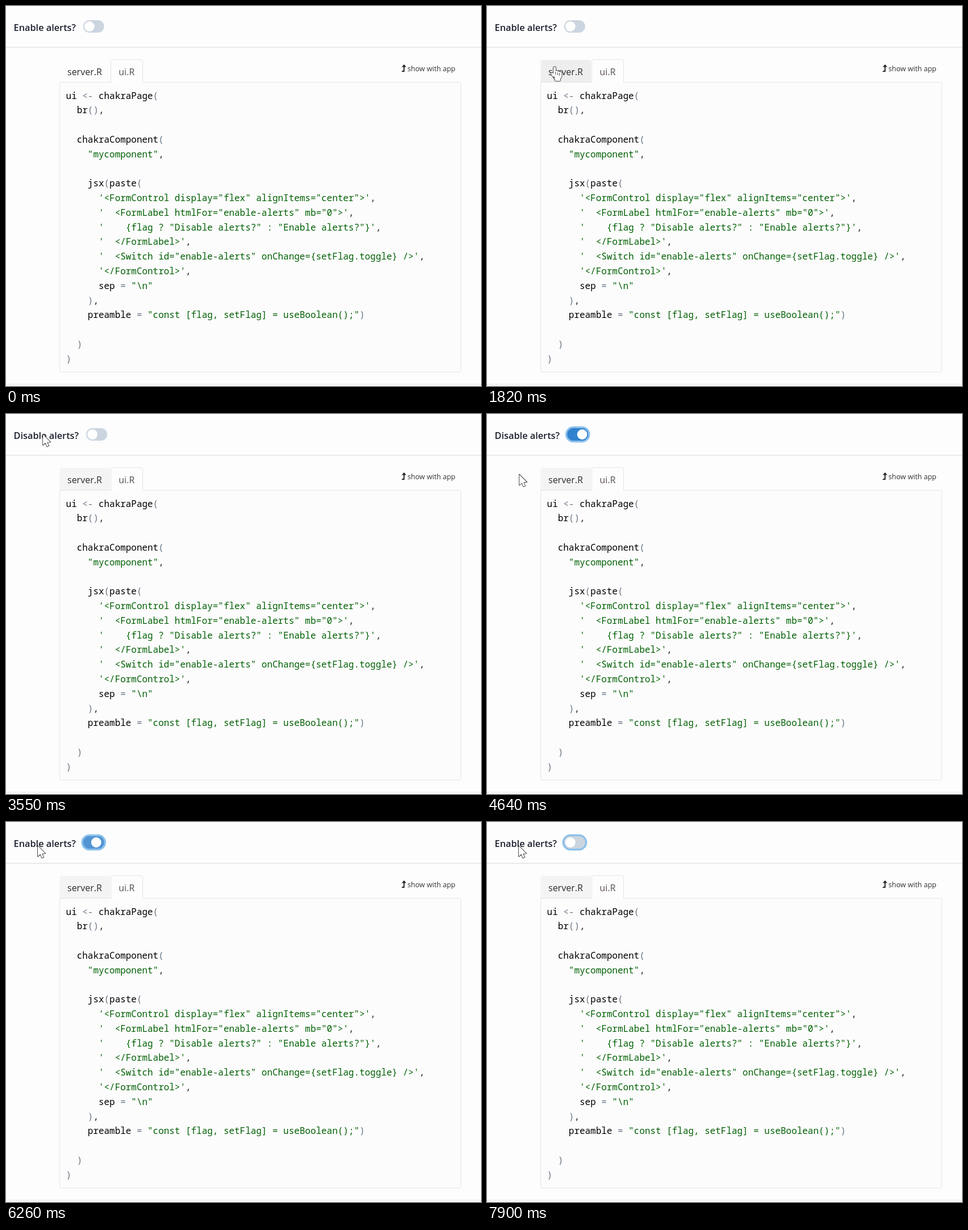
Recreate the animation shown at these times as an HTML page with a canvas. Size 836 by 670 pixels, loop 8000 ms.

```html
<!DOCTYPE html>
<html lang="en">
<head>
<meta charset="utf-8">
<title>Switch demo</title>
<style>
  html, body { margin: 0; width: 100%; height: 100%; overflow: hidden; background: #fdfdfd; }
  canvas { display: block; }
</style>
</head>
<body>
<canvas id="stage" width="836" height="670"></canvas>
<script>
const canvas = document.getElementById('stage');
const ctx = canvas.getContext('2d');
const LOOP = 8000, TICK = 70;
const PAGE = '#fdfdfd', LINE = '#e2e4e7', INK = '#222';
const SANS = '"Open Sans", "Noto Sans", sans-serif';
const MONO = '"Noto Sans Mono", "DejaVu Sans Mono", monospace';

const CODE = String.raw`ui <- chakraPage(
  br(),

  chakraComponent(
    "mycomponent",

    jsx(paste(
      '<FormControl display="flex" alignItems="center">',
      '  <FormLabel htmlFor="enable-alerts" mb="0">',
      '    {flag ? "Disable alerts?" : "Enable alerts?"}',
      '  </FormLabel>',
      '  <Switch id="enable-alerts" onChange={setFlag.toggle} />',
      '</FormControl>',
      sep = "\n"
    ),
    preamble = "const [flag, setFlag] = useBoolean();")

  )
)`.split('\n');
const TOKEN = /'[^']*'|"[^"]*"|<-|[=()]|\w+|,/g;

// Where the pointer travels, from the lower edge up to the label
const ENTRY = { x: 488, y: 670 };
const TRIPS = [
  { at: 530, lasts: 140, x: 387, y: 423 },
  { at: 1070, lasts: 210, x: 209, y: 243 },
  { at: 1610, lasts: 210, x: 119, y: 107 },
  { at: 2150, lasts: 350, x: 65, y: 36 },
  { at: 3960, lasts: 280, x: 57, y: 109 },
  { at: 4640, lasts: 550, x: 56, y: 42 }
];
const DIP = { at: 6740, lasts: 760, depth: 42 };
const TURN_ON = 3550, TURN_OFF = 6200, FADE = 200;
const ARROW = new Path2D('M0 0V18.8L4.3 14.8 7.2 21.4 10.2 20.1 7.3 13.7 13.2 13.5Z');
const HAND = handPath();

const clamp = v => Math.max(0, Math.min(1, v));
const smooth = v => { v = clamp(v); return v * v * (3 - 2 * v); };

// Progress in whole ticks, as a screen recorder would catch it
const stepped = (t, { at, lasts }) =>
  t < at ? 0 : clamp((Math.floor((t - at) / TICK) + 1) / (lasts / TICK + 1));

function handPath() {
  const path = new Path2D();
  path.roundRect(-2, 0, 4, 18, 2);
  for (let i = 1; i < 4; i++) path.roundRect(-2 + i * 3.5, 6 + i, 4, 10, 2);
  path.roundRect(-2, 11, 14.5, 10, [0, 0, 4, 4]);
  path.roundRect(0.5, 18, 9.5, 7, 1);
  path.moveTo(-2, 12);
  path.quadraticCurveTo(-6.5, 9, -6.5, 13);
  path.lineTo(1, 23);
  path.closePath();
  return path;
}

function text(str, x, y, font, color) {
  ctx.font = font;
  ctx.fillStyle = color;
  ctx.fillText(str, x, y);
}

function box(x, y, w, h, r, fill, stroke) {
  ctx.beginPath();
  ctx.roundRect(x, y, w, h, r);
  ctx.fillStyle = fill;
  ctx.fill();
  if (!stroke) return;
  ctx.lineWidth = 1;
  ctx.strokeStyle = stroke;
  ctx.stroke();
}

function pointer(t) {
  if (t < TRIPS[0].at) return null;
  const pos = { ...ENTRY };
  for (const trip of TRIPS) {
    const p = smooth(stepped(t, trip));
    pos.x += (trip.x - pos.x) * p;
    pos.y += (trip.y - pos.y) * p;
  }
  pos.y += DIP.depth * Math.sin(Math.PI * stepped(t, DIP)) ** 2;
  return pos;
}

const overTab = p => !!p && p.x > 94 && p.x < 184 && p.y > 94 && p.y < 134;

function tokenColor(token) {
  if (/^['"]/.test(token)) return '#006003';
  if (/^(<-|[=()])$/.test(token)) return '#687687';
  return token === ',' ? INK : '#000';
}

function drawCode() {
  ctx.font = `15.94px ${MONO}`;
  const pitch = ctx.measureText('0').width;
  CODE.forEach((line, row) => {
    for (const m of line.matchAll(TOKEN)) {
      ctx.fillStyle = tokenColor(m[0]);
      ctx.fillText(m[0], 105.6 + m.index * pitch, 163.6 + row * 25.78);
    }
  });
}

function drawPanel(tabFill) {
  box(0, 72, 836, 1.6, 0, LINE);
  box(0, 666.5, 836, 1, 0, LINE);

  box(94.5, 95, 88.5, 39, [4, 4, 0, 0], tabFill);
  box(184.5, 94.5, 56, 44, [4, 4, 0, 0], PAGE, LINE);
  box(94.5, 134.5, 706, 511, [0, 0, 4, 4], '#fcfcfc', LINE);
  box(185, 133, 55, 3, 0, PAGE);

  text('server.R', 108, 121.6, `16px ${SANS}`, '#2b2b2b');
  text('ui.R', 198.3, 121.6, `16px ${SANS}`, '#5a4f4f');
  text('show with app', 706.6, 114.6, `12.5px ${SANS}`, '#333');

  ctx.fillStyle = INK;
  ctx.fill(new Path2D('M700.5 103l4 4.6h-3v8.4h-5.5l1.5-2h2v-6.4h-3z'));
}

function drawSwitch(t) {
  const disable = t >= TURN_ON && t < TURN_OFF;
  const on = smooth((t - TURN_ON) / FADE) - smooth((t - TURN_OFF) / FADE);
  const left = disable ? 141.1 : 135.8;
  text(disable ? 'Disable alerts?' : 'Enable alerts?', 13.6, 44, `600 16.3px ${SANS}`, '#1a202c');

  const ring = clamp((t - TURN_ON) / TICK);
  box(left - 3.3, 21.7, 43.6, 28.6, 14.3, `rgba(139,192,236,${ring})`);
  const mix = (a, b) => Math.round(a + (b - a) * on);
  box(left, 25, 37, 22, 11, `rgb(${mix(203, 49)},${mix(213, 130)},${mix(224, 206)})`);
  box(left + 2.1 + 15.4 * on, 27.1, 17.8, 17.8, 8.9, '#fff');
}

function drawPointer({ x, y }, shape) {
  ctx.save();
  ctx.translate(x, y);
  ctx.lineJoin = 'round';
  ctx.strokeStyle = INK;
  ctx.lineWidth = 1.6;
  ctx.stroke(shape);
  ctx.fillStyle = '#fff';
  ctx.fill(shape);
  if (shape === HAND) {
    ctx.fillStyle = INK;
    for (let i = 0; i < 3; i++) ctx.fillRect(1.3 + i * 3.5, 9 + i, 0.8, 5);
  }
  ctx.restore();
}

function draw(t) {
  const tip = pointer(t);
  const hover = overTab(tip);
  const visited = t >= TRIPS[3].at;
  ctx.fillStyle = PAGE;
  ctx.fillRect(0, 0, canvas.width, canvas.height);
  drawPanel(hover ? '#eee' : visited ? '#f4f4f4' : PAGE);
  drawCode();
  drawSwitch(t);
  if (tip) drawPointer(tip, hover ? HAND : ARROW);
}

const begin = performance.now();
function tick() {
  draw((performance.now() - begin) % LOOP);
  requestAnimationFrame(tick);
}
tick();
</script>
</body>
</html>
```
